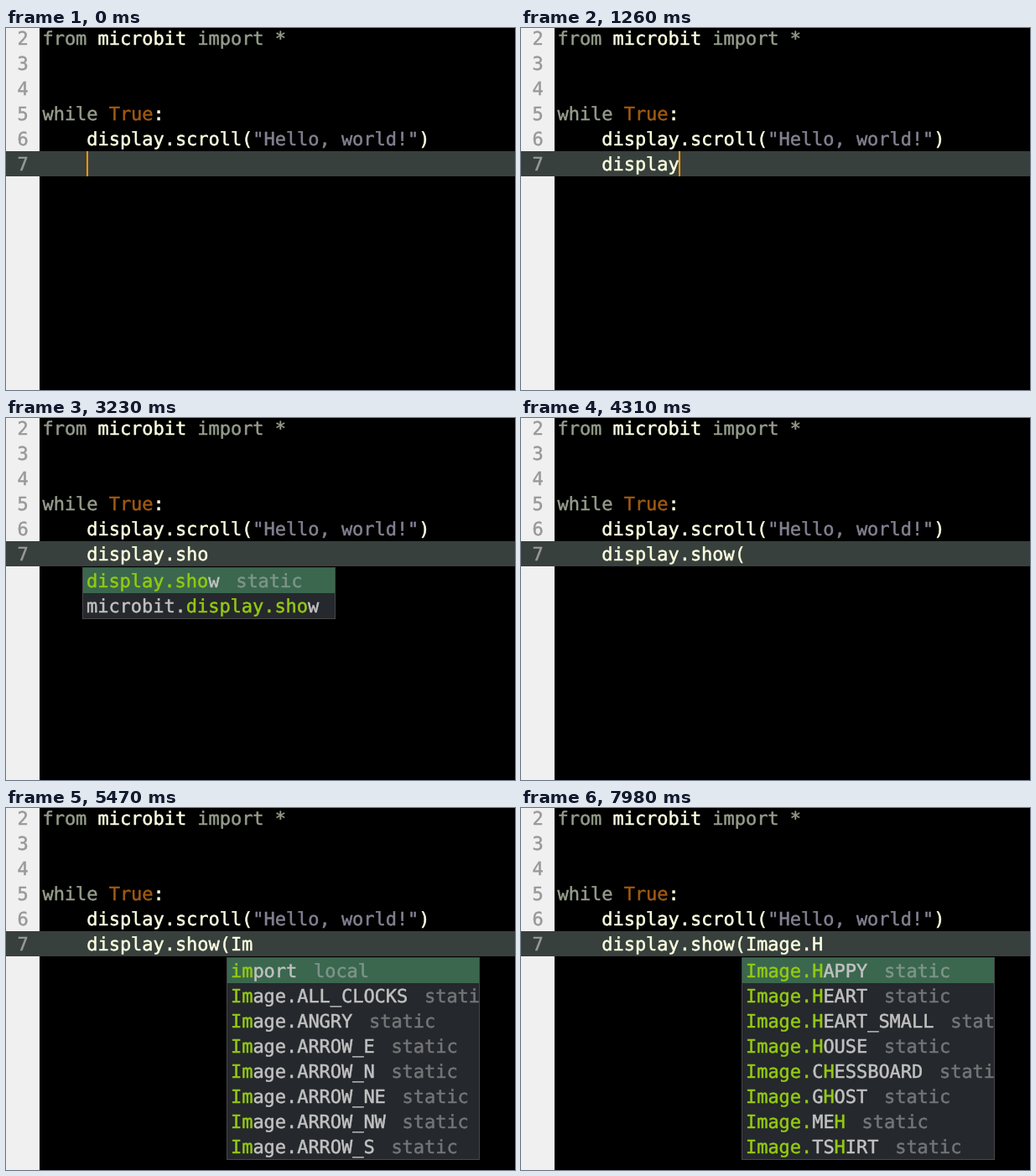
An HTML page for the animation above (8000 ms loop, 607x432 px).

```html
<!DOCTYPE html>
<html lang="en">
<head>
<meta charset="utf-8">
<title>Code completion</title>
<style>
html, body { margin: 0; width: 100%; height: 100%; overflow: hidden; background: #000; }
body {
  position: relative;
  font: 22px/30px "DejaVu Sans Mono", monospace;
  letter-spacing: -.045px;
  text-rendering: geometricPrecision;
  -webkit-text-stroke: .5px;
  color: #fcffe0;
}
div { position: absolute; white-space: pre; }
#gutter { left: 0; top: 0; width: 40px; height: 100%; background: #f0f0f0; }
#active { left: 0; top: 147px; width: 100%; height: 30px; background: #38403d; }
#numbers { left: 13.5px; top: -1px; color: #999; }
#code { left: 43.5px; top: -1px; }
#cursor { top: 147px; width: 2px; height: 30px; background: #f90; }
.key { color: #949c8b; }
.const { color: #a05912; }
.str { color: #838191; }
#popup {
  top: 178px; width: 300px; overflow: hidden;
  border: 1px solid #484747; background: #25282c; color: #c1c1c1;
}
#popup div { position: static; height: 28px; padding: 2px 0 0 4px; }
#popup div:first-child { background: #3a674e; }
#popup b { font-weight: 400; color: #93ca12; }
#popup i { font-style: normal; margin-left: .9em; opacity: .5; }
</style>
</head>
<body>
<div id="gutter"></div>
<div id="active"></div>
<div id="numbers">2
3
4
5
6
7</div>
<div id="code"><span class="key">from</span> microbit <span class="key">import *</span>


<span class="key">while</span> <span class="const">True</span>:
    display.scroll(<span class="str">"Hello, world!"</span>)
    <span id="typed"></span></div>
<div id="cursor"></div>
<div id="popup"></div>
<script>
const $ = id => document.getElementById(id);
const LOOP = 8000, CHAR = 13.2, LEFT = 43, INDENT = 4;

// Completion entries are [caption, meta]
const tag = (meta, names, prefix = '') =>
  names.split(' ').map(name => [prefix + name, meta]);
const local = name => tag('local', name);
const keywords = names => tag('keyword', names);
const members = (names, prefix) => tag('static', names, prefix);

const display = members('clear get_pixel is_on off on read_light_level scroll set_pixel', 'display.');
const images = members('ALL_CLOCKS ANGRY ARROW_E ARROW_N ARROW_NE ARROW_NW ARROW_S ARROW_SE', 'Image.');
const lists = {
  d: [...local('display'), ['def - define a named function', 'snippet'],
    ['docs - create a comment block', 'snippet'],
    ...keywords('debugger dir dict delattr divmod')],
  di: [...local('display'), ...keywords('dir dict divmod'), ...display.slice(0, 4)],
  dis: [...local('display'), ...display.slice(0, 7)],
  dot: display,
  s: [...members('scroll set_pixel show is_on', 'display.'),
    ...members('scroll set_pixel show is_on', 'microbit.display.')],
  show: members('display.show microbit.display.show'),
  i: [...local('import'), ...keywords('intern id iter issubclass isinstance int input')],
  im: [...local('import'), ...images.slice(0, 7)],
  image: images,
  h: members('HAPPY HEART HEART_SMALL HOUSE CHESSBOARD GHOST MEH TSHIRT', 'Image.')
};

// [time in ms, typed text, completion list]
const edits = [
  [0, ''],
  [630, 'd', 'd'],
  [720, 'di', 'di'],
  [900, 'dis', 'dis'],
  [1260, 'display'],
  [1530, 'display.', 'dot'],
  [2330, 'display.s', 's'],
  [2420, 'display.sh', 'show'],
  [2600, 'display.sho', 'show'],
  [3320, 'display.show'],
  [3770, 'display.show('],
  [4660, 'display.show(I', 'i'],
  [4840, 'display.show(Im', 'im'],
  [5560, 'display.show(Ima', 'image'],
  [5830, 'display.show(Imag', 'image'],
  [6000, 'display.show(Image', 'image'],
  [6270, 'display.show(Image.', 'image'],
  [7350, 'display.show(Image.H', 'h']
];
// Spans in which the cursor is hidden
const blinks = [[270, 630], [2160, 2330], [3230, 3320], [4310, 4660],
  [5470, 5560], [6900, 7350], [7980, LOOP]];

// Marks the query's letters, in order, wherever they first occur
function highlight(caption, query) {
  let next = 0;
  return [...caption].map(ch => {
    if (next >= query.length || ch.toLowerCase() !== query[next].toLowerCase()) return ch;
    next++;
    return `<b>${ch}</b>`;
  }).join('').replaceAll('</b><b>', '');
}

function showEdit([, text, list]) {
  $('typed').textContent = text;
  $('cursor').style.left = Math.round(LEFT + (INDENT + text.length) * CHAR) + 'px';
  $('popup').hidden = !list;
  if (!list) return;
  const start = text.indexOf('(') + 1;
  const query = text.slice(start);
  $('popup').style.left = (start ? 263 : 91) + 'px';
  $('popup').innerHTML = lists[list].map(([caption, meta]) =>
    `<div>${highlight(caption, query)}<i>${meta}</i></div>`).join('');
}

let shown;
function draw() {
  const t = performance.now() % LOOP;
  const edit = edits.findLast(([time]) => time <= t);
  if (edit !== shown) showEdit(shown = edit);
  $('cursor').hidden = blinks.some(([from, to]) => t >= from && t < to);
  requestAnimationFrame(draw);
}
draw();
</script>
</body>
</html>
```
